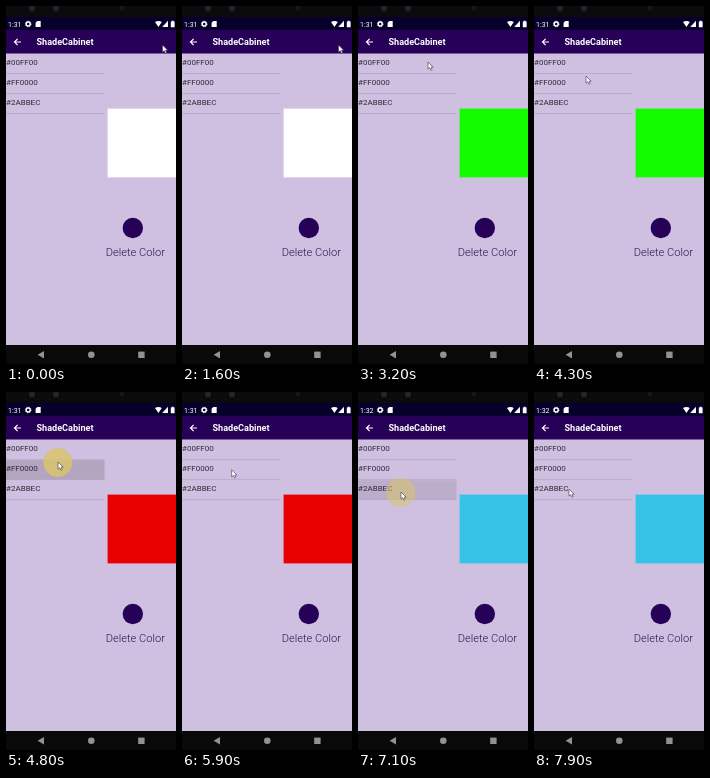
Write an HTML page that moves like this. It is 170x358 px and loops after 8 s.

```html
<!DOCTYPE html>
<html lang="en">
<head>
<meta charset="utf-8">
<title>ShadeCabinet</title>
<style>
html, body { margin: 0; width: 100%; height: 100%; overflow: hidden; background: #000; }
svg { display: block; width: 170px; height: 358px; }
text { font-family: Roboto, Inter, sans-serif; }
.clock { font-size: 7px; fill: #fff; }
.title { font-size: 9.1px; font-weight: 700; fill: #fff; }
.row { font-size: 8px; fill: #302b38; }
.label { font-size: 11.1px; font-weight: 300; fill: #2b1453; }
</style>
</head>
<body>
<svg viewBox="0 0 170 358" xmlns="http://www.w3.org/2000/svg">
  <defs>
    <clipPath id="rowClip"><rect id="clipBox" width="98.5" height="19.5"/></clipPath>
  </defs>

  <rect width="170" height="358" fill="#0b0a0d"/>
  <g fill="#25242a">
    <circle cx="26" cy="2.5" r="3"/>
    <circle cx="50" cy="2.5" r="3"/>
    <circle cx="116" cy="2" r="2.5" fill="#17161b"/>
  </g>
  <rect y="11" width="170" height="13.5" fill="#08002c"/>
  <rect y="24" width="170" height="24" fill="#270057"/>
  <rect y="47.5" width="170" height="291.5" fill="#cfbfe0"/>

  <!-- status bar -->
  <text class="clock" id="clock" x="2" y="20.7">1:31</text>
  <circle cx="22.2" cy="18" r="2" fill="none" stroke="#fff" stroke-width="1.5"/>
  <circle cx="22.2" cy="18" r="2.8" fill="none" stroke="#fff" stroke-width=".9" stroke-dasharray="1.1 1.1"/>
  <path d="M29.6 16.7l1.7-1.7h3.4v6h-5.1z" fill="#fff"/>
  <path d="M149 16q3.4-2 6.8 0l-3.4 5z M162 14.8v6.2h-5.8z M164.8 15.6h1v-.9h1.8v.9h1v5.6h-3.8z" fill="#fff"/>

  <!-- app bar -->
  <path d="M15 36H8.6M11.6 32.9L8.5 36l3.1 3.1" fill="none" stroke="#fff" stroke-width="1.2"/>
  <text class="title" x="30.5" y="39.4">ShadeCabinet</text>

  <!-- list -->
  <g clip-path="url(#rowClip)"><circle id="ripple" cx="51" fill="#97899f"/></g>
  <g id="list"></g>

  <!-- details -->
  <rect id="swatch" x="101.6" y="102.6" width="69" height="68.8" fill="#fff"/>
  <circle cx="126.8" cy="222" r="10.2" fill="#270057"/>
  <text class="label" x="99.8" y="249.6">Delete Color</text>

  <!-- navigation bar -->
  <rect y="339" width="170" height="19" fill="#09090a"/>
  <g fill="#929292">
    <path d="M31.6 348.8l6.4-3.7v7.4z"/>
    <circle cx="85.3" cy="348.8" r="3.3"/>
    <rect x="132.2" y="345.6" width="6.4" height="6.4"/>
  </g>

  <circle id="halo" fill="#d9c566"/>
  <path id="cursor" d="M0 0V7.2L1.7 5.7 2.9 8.3 4.1 7.7 3 5.2H5.2Z" fill="#fff" stroke="#3b3544" stroke-width=".6"/>
</svg>
<script>
const LOOP = 8000, STEP = 100;
const $ = id => document.getElementById(id);
const rowTop = i => 48 + i * 20;

const list = ["#00FF00", "#FF0000", "#2ABBEC"];
$("list").innerHTML = list.map((name, i) =>
  `<text class="row" x="0" y="${rowTop(i) + 11.4}">${name}</text>
   <path d="M0 ${rowTop(i) + 19.6}H98.5" stroke="#b5a6c4" stroke-width=".8"/>`).join("");

// start, end, x, y
const moves = [
  [0, 0, 156.5, 39],
  [1600, 2400, 70, 56],
  [3300, 3800, 52, 70],
  [5700, 6300, 43, 100],
  [7800, 7900, 35, 97]
];

const taps = [
  { at: 2500, row: 0, color: "#14fc00" },
  { at: 4400, row: 1, color: "#e80000" },
  { at: 6600, row: 2, color: "#35c3e8" }
];

const clamp = v => Math.max(0, Math.min(1, v));
const span = (t, a, b) => clamp((t - a) / (b - a));
const ease = p => p * p * (3 - 2 * p);

function cursorAt(t) {
  let [, , x, y] = moves[0];
  for (const [a, b, toX, toY] of moves.slice(1)) {
    const p = ease(span(t, a, b));
    x += (toX - x) * p;
    y += (toY - y) * p;
  }
  return [x, y];
}

function set(el, attrs) {
  for (const key in attrs) el.setAttribute(key, attrs[key]);
}

function draw(t) {
  const [x, y] = cursorAt(t);
  set($("cursor"), { transform: `translate(${x} ${y})` });
  $("clock").textContent = t < 7100 ? "1:31" : "1:32";

  const done = taps.filter(tap => t >= tap.at + 400);
  set($("swatch"), { fill: done.length ? done[done.length - 1].color : "#fff" });

  const tap = taps.find(tap => t >= tap.at && t < tap.at + 800);
  const age = tap ? t - tap.at : 800;
  const row = tap ? tap.row : 0;
  const fade = 1 - span(age, 400, 700);
  set($("halo"), {
    cx: x - .2, cy: y + .5, r: 4 + 10.5 * span(age, -50, 400),
    opacity: .8 * span(age, 0, 400) * fade
  });
  set($("clipBox"), { y: rowTop(row) + .2 });
  set($("ripple"), {
    cy: rowTop(row), r: 34 * span(age, 100, 300) + 30 * span(age, 300, 400),
    opacity: (.2 + .3 * span(age, 300, 400)) * fade
  });
}

const start = performance.now();
function tick() {
  const t = (performance.now() - start) % LOOP;
  draw(Math.floor(t / STEP) * STEP);
  requestAnimationFrame(tick);
}
tick();
</script>
</body>
</html>
```
